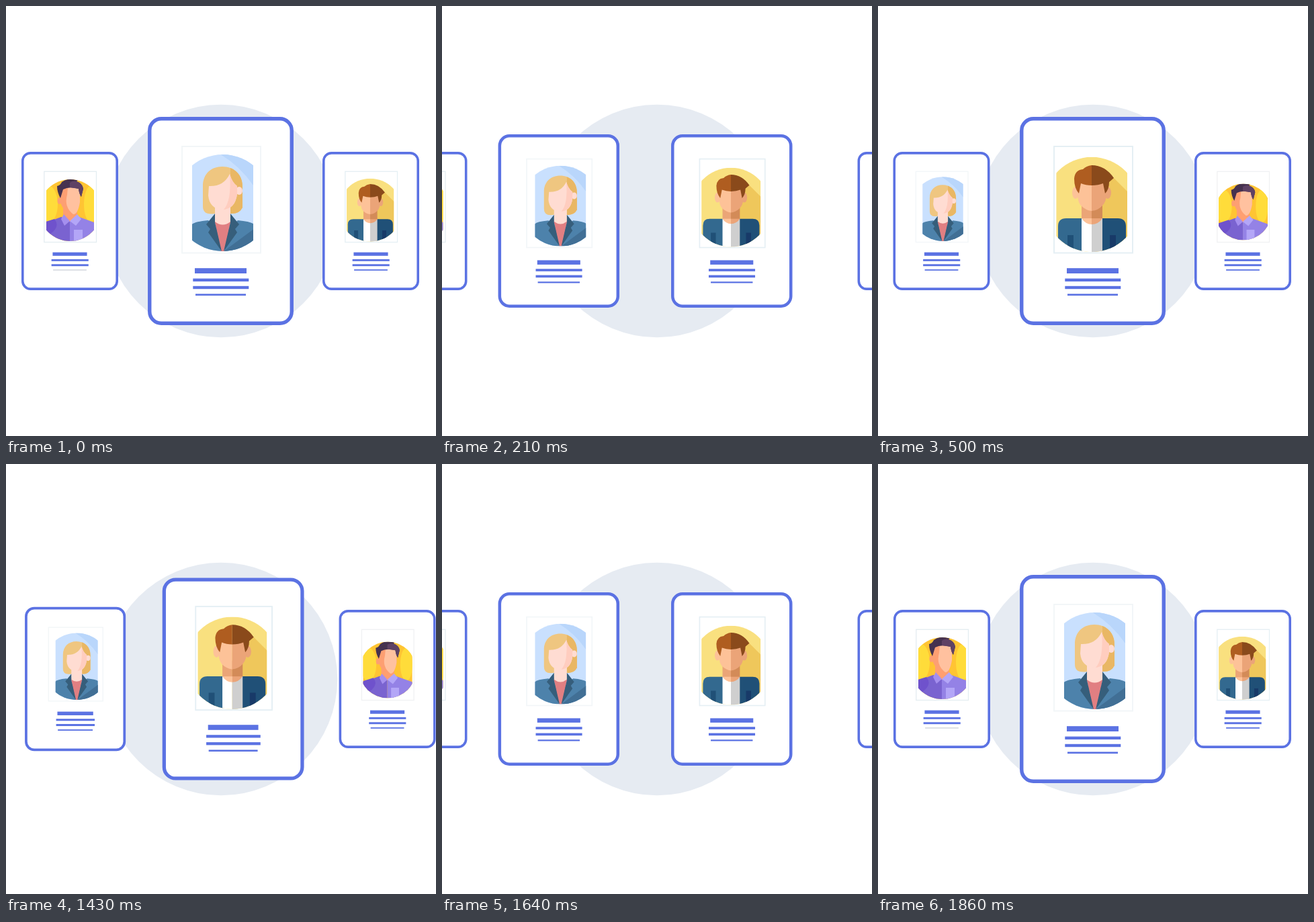
Animation, 640 px wide and 640 px high, one loop 2.87 s. Source, as an HTML page with a canvas:

```html
<!DOCTYPE html>
<html lang="en">
<head>
<meta charset="utf-8">
<title>Profile cards</title>
<style>
html, body { margin: 0; width: 100%; height: 100%; overflow: hidden; background: #fff; }
canvas { display: block; width: 640px; height: 640px; }
</style>
</head>
<body>
<canvas id="stage" width="640" height="640"></canvas>
<script>
const ctx = document.getElementById('stage').getContext('2d');
const BLUE = '#5b72e3';
const SMALL = 0.664;
const LOOP = 2870;
const FPS = 14;

// Progress in twelfths for each tick of the two slides
const SLIDE_OUT = [0, 2, 4, 6, 8, 9, 11, 12];
const SLIDE_BACK = [0, 1, 3, 5, 6, 8, 10, 12];
const BACK_TICK = 19;

function fill(color, path) {
  ctx.fillStyle = color;
  ctx.fill(new Path2D(path));
}

function ellipse(color, x, y, rx, ry = rx) {
  ctx.fillStyle = color;
  ctx.beginPath();
  ctx.ellipse(x, y, rx, ry, 0, 0, 7);
  ctx.fill();
}

function rect(color, x, y, w, h) {
  ctx.fillStyle = color;
  ctx.fillRect(x, y, w, h);
}

// A round picture whose sides are cut off straight
function clipRound(x, y, r, half) {
  ctx.beginPath();
  ctx.rect(x - half, y - r, 2 * half, 2 * r);
  ctx.clip();
  ctx.beginPath();
  ctx.arc(x, y, r, 0, 7);
  ctx.clip();
}

function drawWoman() {
  ctx.translate(-319.5, -320);
  clipRound(322.5, 293, 72, 45.5);
  rect('#c9e0fe', 270, 220, 110, 150);
  fill('#b9d6fb', 'M318 220 Q348 238 368 267 V220Z');

  fill('#efc680', 'M293 268 C293 250 305 239 322 239 C340 239 352 251 352 269 V300 Q347 310 334 309 H311 Q293 312 293 298Z');
  fill('#e9b764', 'M334 241 C346 246 352 256 352 269 V300 Q347 310 334 309Z');

  fill('#4d82ab', 'M276 326 Q279 321 301 319 L322 340 L345 319 Q367 321 370 326 V366 H276Z');
  fill('#416f95', 'M324 365 L370 331 V366Z');
  fill('#e17f82', 'M310 318 H335 L325 365 H320Z');
  fill('#ffdcd2', 'M311 296 H334 V321 Q322.5 330 311 321Z');
  fill('#365e7b', 'M311 309 L298 325 L304 332 L301 337 L321 365 L311 322Z');
  fill('#365e7b', 'M334 309 L347 325 L341 332 L344 337 L324 365 L334 322Z');

  ellipse('#ffdcd2', 347, 275, 5, 6);
  fill('#ffdcd2', 'M302 268 Q324 269 333 250 Q336 262 344 268 V280 Q341 303 322 303 Q303 302 301 282Z');
  fill('#ffcdbf', 'M333 250 Q336 262 344 268 V280 Q341 301 324 303 Q336 290 333 250Z');
}

function drawMan() {
  ctx.translate(-319.5, -320);
  clipRound(318.2, 295.5, 70.7, 52.8);
  rect('#f9e07f', 260, 220, 120, 150);
  fill('#efc75b', 'M350 255 L374 279 V350 H318 V280Z');

  fill('#33698f', 'M268 370 V328 Q268 316 280 316 H304 V370Z');
  fill('#205077', 'M333 370 V316 H357 Q369 316 369 328 V370Z');
  rect('#205077', 282, 341, 9, 30);
  rect('#183a68', 345, 341, 9, 30);
  rect('#ffffff', 303, 316, 15, 55);
  rect('#cfcfcf', 318, 316, 16, 55);

  fill('#fdc298', 'M303 314 H318 V325 Q309 325 303 316Z');
  fill('#eba478', 'M318 314 H334 V316 Q328 325 318 325Z');
  rect('#eba577', 303, 292, 15, 24);
  rect('#d38b58', 318, 292, 16, 24);
  ellipse('#fdc298', 294, 278, 5, 9);
  ellipse('#eba478', 342, 278, 5, 9);
  fill('#fdc298', 'M297 260 H318 V305 Q309 304 302 297 Q297 291 297 280Z');
  fill('#eba478', 'M318 260 H340 V280 Q340 291 334 297 Q328 304 318 305Z');

  fill('#af5d20', 'M299 279 Q292 271 292 257 Q293 244 305 243 Q310 238 318 237 V267 Q309 267 302 264Z');
  fill('#8a4a1b', 'M318 237 Q338 237 351 256 L344 262 Q344 273 338 279 L335 264 Q328 267 318 267Z');
}

function drawYouth(shrink, half) {
  ctx.scale(1 / SMALL, 1 / SMALL);
  ctx.translate(0.5, shrink < 1 ? -13.5 : -16);
  ctx.scale(shrink, shrink);
  ctx.translate(-95.5, -304);
  clipRound(95.5, 304, 46, half / shrink);
  rect('#ffc433', 45, 255, 100, 100);
  ellipse('#ffdc3a', 64, 295, 13, 27);
  ellipse('#ffdc3a', 126, 295, 10, 27);

  fill('#7a63d0', 'M50 326 L82 314 L95 318 V352 H50Z');
  fill('#9482e6', 'M95 318 L109 314 L142 326 V352 H95Z');
  fill('#6f52cc', 'M50 324 L72 317 Q80 326 70 336 L62 342 H50Z');
  rect('#b3a6f7', 101, 333, 13, 18);
  fill('#ff9f70', 'M85 298 H106 V312 L95 321 L85 312Z');
  fill('#a58fee', 'M82 317 L86 310 L95 320 L87 327Z');
  fill('#b3a6f7', 'M95 320 L106 310 L112 317 L104 327Z');

  ellipse('#fd9f72', 79.5, 290, 3, 5);
  fill('#fd9f72', 'M81 270 H110 V292 Q107 310 98 310 Q86 307 81 293Z');
  fill('#ffc19f', 'M92 270 H110 V292 Q107 310 100 310 Q86 299 91 281Z');
  fill('#46324f', 'M81 286 Q76 277 76 268 Q81 267 83 262 Q90 257 98 257.5 L107 259 L105 261 Q114 264 115 272 L112 284 Q109 280 108 272 Q94 268 85 273Z');
  fill('#5f4264', 'M95 263 Q99 260 105 261 Q114 264 115 272 L112 284 Q109 280 108 272 L95 270Z');
}

function drawCard(x, scale, portrait, frameColor, lastLine = BLUE) {
  ctx.save();
  ctx.translate(x, 320);
  ctx.scale(scale, scale);

  ctx.beginPath();
  ctx.roundRect(-105.75, -152.25, 211.5, 304.5, 17.5);
  ctx.fillStyle = '#fff';
  ctx.fill();
  ctx.strokeStyle = BLUE;
  ctx.lineWidth = 5.4;
  ctx.stroke();

  ctx.strokeStyle = frameColor;
  ctx.lineWidth = 2;
  ctx.strokeRect(-57.5, -111, 117, 158.5);

  rect(BLUE, -38.5, 70.2, 77, 7.8);
  rect(BLUE, -41.2, 85.6, 83, 4.4);
  rect(BLUE, -41.2, 96.8, 83, 4.4);
  rect(lastLine, -37.5, 108.4, 75, 2.7);

  portrait();
  ctx.restore();
}

function progressAt(time) {
  const tick = Math.ceil((Math.floor(time / 10) * 10 + 5) * FPS / 1000) - 1;
  return tick < BACK_TICK
    ? SLIDE_OUT[Math.min(tick, 7)] / 12
    : 1 - SLIDE_BACK[Math.min(tick - BACK_TICK, 7)] / 12;
}

function draw(time) {
  const q = progressAt(time);
  const lead = q + 0.59 * q * (1 - q);
  const grow = (1 - SMALL) * q;

  rect('#fff', 0, 0, 640, 640);
  ellipse('#e6ebf2', 320, 320, 173.3);
  drawCard(95 - 259 * q, SMALL, () => drawYouth(1, 35.5), '#e4edf1', '#d9dce2');
  drawCard(543 + 295 * (1 - q), SMALL, () => drawYouth(0.913, 36.5), '#f0f1f3');
  drawCard(319.5 - 225 * lead, 1 - grow, drawWoman, '#f2f6f8');
  drawCard(543 - 223.5 * q, SMALL + grow, drawMan, '#e5eff4');
}

const start = performance.now();
function loop() {
  draw((performance.now() - start) % LOOP);
  requestAnimationFrame(loop);
}
loop();
</script>
</body>
</html>
```
